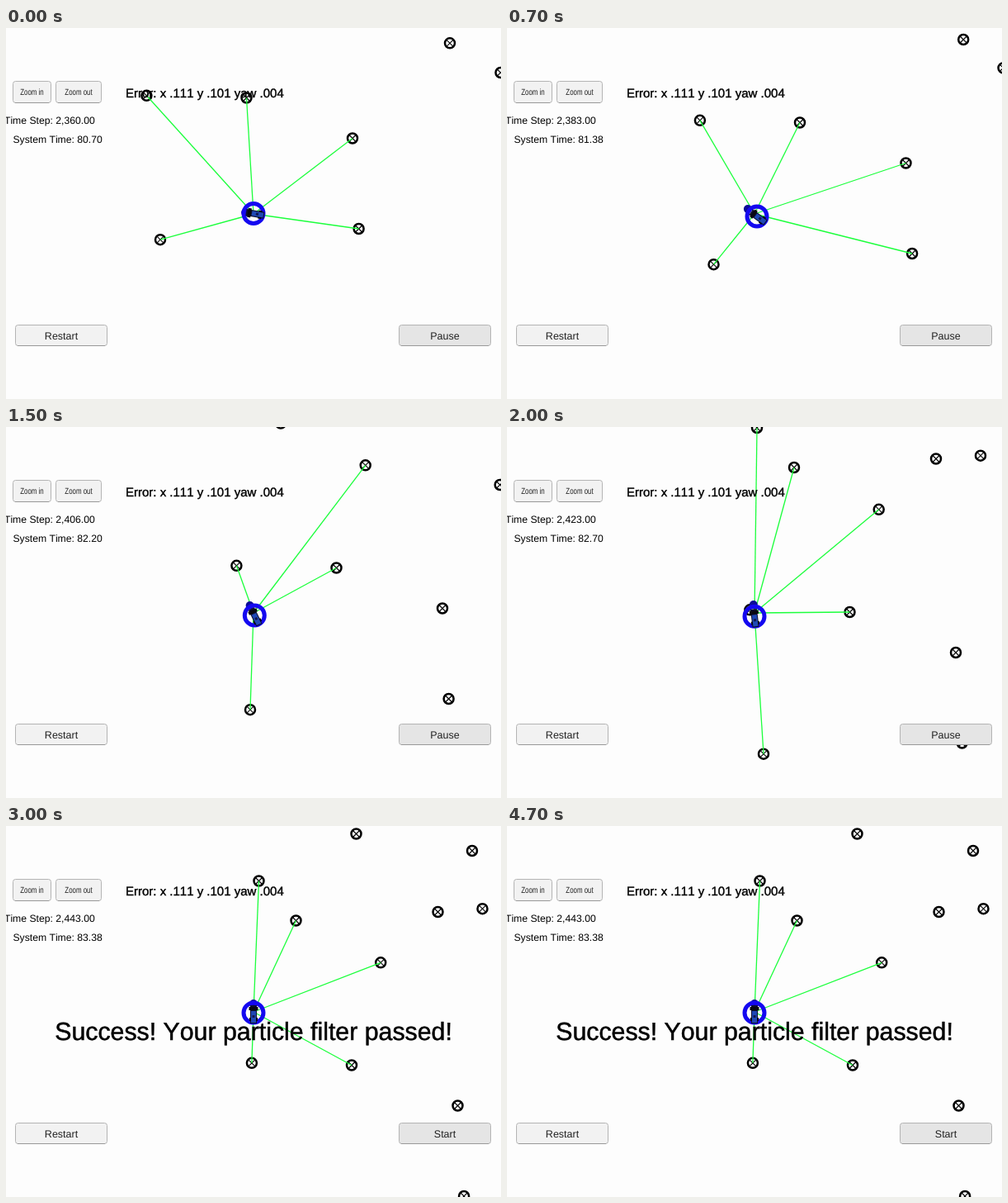
Write an HTML page with a canvas that moves like this. It is 600 px wide and 449 px high and loops after 4800 ms.

```html
<!DOCTYPE html>
<html lang="en">
<head>
<meta charset="utf-8">
<title>Particle filter simulator</title>
<style>
  html, body { margin: 0; width: 100%; height: 100%; overflow: hidden; background: #fdfdfd; }
  canvas { display: block; }
</style>
</head>
<body>
<canvas id="stage" width="600" height="449"></canvas>
<script>
const ctx = document.getElementById('stage').getContext('2d');
ctx.fontKerning = 'none';
ctx.textRendering = 'geometricPrecision';

const LOOP = 4800, TICK = 100, STOP = 2700, SUCCESS = 2800;
const HUB = { x: 300, y: 225 }, SENSOR_RANGE = 227;

const landmarks = [
  [170.4, 81.8], [291.5, 84.5], [420, 133.5], [427.6, 243], [187, 256.2],
  [538, 18.3], [599.5, 54], [489.7, -16], [326.7, -39.7], [224, -90.5],
  [179, -138.5], [396, -101], [450, -104.8], [437.5, -175], [297, -195.5]
];

// Camera travel, heading (degrees) and speed (px/ms), estimate ring, counters
const keys = [
  { t: 0,    x: 0,     y: 0,     heading: 10, speed: .1,   rx: 300,   ry: 224.5, step: 2360, clock: 80.70 },
  { t: 700,  x: 63.5,  y: 30,    heading: 36, speed: .095, rx: 303,   ry: 228,   step: 2383, clock: 81.38 },
  { t: 1500, x: 109,   y: 86,    heading: 64, speed: .1,   rx: 301.3, ry: 228,   step: 2406, clock: 82.20 },
  { t: 2000, x: 124,   y: 139.5, heading: 83, speed: .102, rx: 300,   ry: 229.3, step: 2423, clock: 82.70 },
  { t: 2500, x: 127.5, y: 187.5, heading: 90, speed: .094, rx: 300,   ry: 226,   step: 2437, clock: 83.20 },
  { t: STOP, x: 127.5, y: 205,   heading: 90, speed: .085, rx: 300,   ry: 226,   step: 2443, clock: 83.38 }
];

const radians = deg => deg * Math.PI / 180;

function stateAt(time) {
  const t = Math.min(time, STOP);
  const i = Math.max(1, keys.findIndex(k => k.t >= t));
  const a = keys[i - 1], b = keys[i], span = b.t - a.t, s = (t - a.t) / span;
  const lerp = name => a[name] + (b[name] - a[name]) * s;
  const hermite = (name, trig) => {
    const va = a.speed * trig(radians(a.heading)) * span;
    const vb = b.speed * trig(radians(b.heading)) * span;
    const ease = s * s * (3 - 2 * s);
    return a[name] + (b[name] - a[name]) * ease + va * s * (1 - s) ** 2 - vb * s * s * (1 - s);
  };
  return {
    x: hermite('x', Math.cos), y: hermite('y', Math.sin),
    heading: radians(lerp('heading')), rx: lerp('rx'), ry: lerp('ry'),
    step: Math.round(lerp('step')), clock: lerp('clock')
  };
}

function line(x1, y1, x2, y2, color, width) {
  ctx.strokeStyle = color;
  ctx.lineWidth = width;
  ctx.beginPath();
  ctx.moveTo(x1, y1);
  ctx.lineTo(x2, y2);
  ctx.stroke();
}

function ring(x, y, radius, color, width) {
  ctx.strokeStyle = color;
  ctx.lineWidth = width;
  ctx.beginPath();
  ctx.arc(x, y, radius, 0, 7);
  ctx.stroke();
}

function box(x, y, w, h, color) {
  ctx.fillStyle = color;
  ctx.fillRect(x, y, w, h);
}

function text(str, x, y, size, align, color = '#000', weight = 0) {
  ctx.font = `${size}px "Liberation Sans", Arial, sans-serif`;
  ctx.textAlign = align;
  ctx.fillStyle = ctx.strokeStyle = color;
  ctx.fillText(str, x, y);
  if (weight) {
    ctx.lineWidth = weight;
    ctx.strokeText(str, x, y);
  }
}

function button(label, x, y, w, h, fill, size, squash = 1) {
  ctx.fillStyle = fill;
  ctx.strokeStyle = '#b4b4b4';
  ctx.lineWidth = 1;
  ctx.beginPath();
  ctx.roundRect(x + .5, y + .5, w - 1, h - 1, 3);
  ctx.fill();
  ctx.stroke();
  line(x + 3, y + h - .5, x + w - 3, y + h - .5, '#999', 1);
  ctx.save();
  ctx.translate(x + w / 2, y + h / 2 + size * .36);
  ctx.scale(squash, 1);
  text(label, 0, 0, size, 'center', '#222');
  ctx.restore();
}

function marker(x, y) {
  line(x - 4, y - 4, x + 4, y + 4, '#000', 1.1);
  line(x - 4, y + 4, x + 4, y - 4, '#000', 1.1);
  ring(x, y, 6, '#000', 2.5);
}

function car(x, y, heading) {
  ctx.save();
  ctx.translate(x, y);
  ctx.rotate(heading);
  box(-9, -4, 22, 8, '#0c0f30');
  box(-7, -5.5, 4, 11, '#080810');
  box(6, -5, 4, 10, '#080810');
  box(-2, -3, 14, 6, '#1f48b4');
  box(3, -1.5, 3, 3, '#101850');
  ctx.restore();
}

function draw(time) {
  const s = stateAt(time), done = time >= SUCCESS;
  box(0, 0, 600, 449, '#fdfdfd');

  const points = landmarks.map(([x, y]) => [x + s.x, y + s.y]);
  for (const [x, y] of points) marker(x, y);
  for (const [x, y] of points) {
    if (Math.hypot(x - HUB.x, y - HUB.y) < SENSOR_RANGE) line(HUB.x, HUB.y, x, y, '#1cff3c', 1.3);
  }

  ctx.fillStyle = '#0c0a98';
  ctx.beginPath();
  ctx.arc(HUB.x - 10 * Math.cos(s.heading), HUB.y - 10 * Math.sin(s.heading), 5, 0, 7);
  ctx.fill();
  ring(s.rx, s.ry, 12, '#1408f0', 5);
  car(s.rx, s.ry, s.heading);

  const light = '#f2f2f2', dark = '#e5e5e5';
  button('Zoom in', 8, 64, 47, 27, light, 10.5, .75);
  button('Zoom out', 60, 64, 56, 27, light, 10.5, .75);
  button('Restart', 11, 359, 112, 26, light, 12.5);
  button(done ? 'Start' : 'Pause', 476, 359, 112, 26, dark, 12.5);

  text(`Time Step: ${s.step.toLocaleString('en-US')}.00`, 107.7, 116, 12.2, 'right');
  text(`System Time: ${s.clock.toFixed(2)}`, 116.8, 138.5, 12.2, 'right');
  text('Error: x .111 y .101 yaw .004', 145, 84.3, 15, 'left', '#000', .4);
  if (done) text('Success! Your particle filter passed!', 300, 259, 30.3, 'center', '#000', .5);
}

function frame() {
  draw(Math.floor(performance.now() % LOOP / TICK) * TICK);
  requestAnimationFrame(frame);
}
frame();
</script>
</body>
</html>
```
